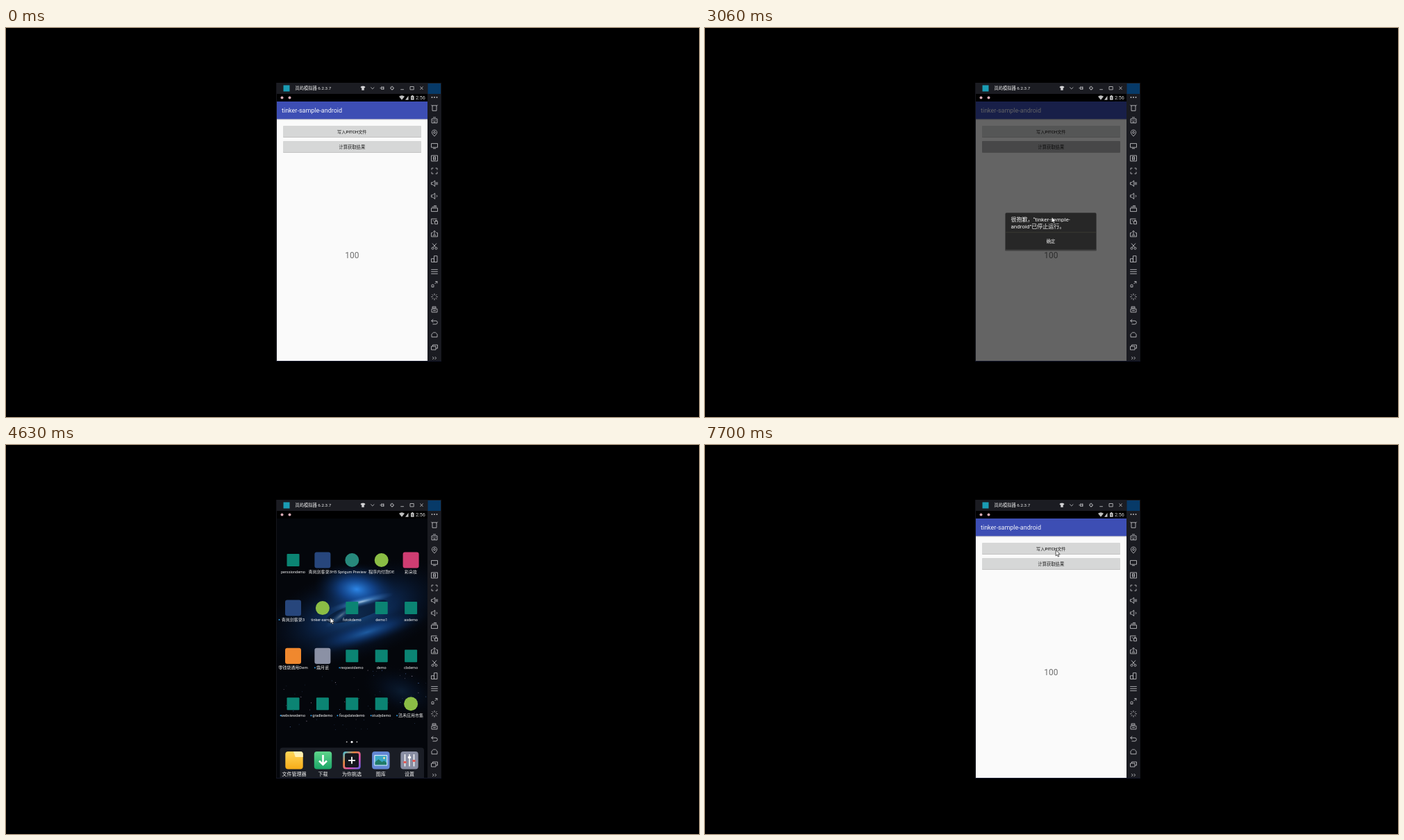
An HTML page for the animation above (8 s loop, 998 by 561 pixels).

```html
<!DOCTYPE html>
<html lang="zh">
<head>
<meta charset="utf-8">
<style>
  html, body { margin: 0; width: 100%; height: 100%; overflow: hidden; background: #000; }
  svg { display: block; width: 100%; height: 100%; }
  text { font-family: Roboto, "Noto Sans CJK SC", "Noto Sans CJK", sans-serif; }
  .mid { text-anchor: middle; }
  .line { fill: none; stroke: #b9b9bd; stroke-width: .9; }
</style>
</head>
<body>
<svg id="stage" viewBox="0 0 998 561">
  <defs>
    <radialGradient id="glow">
      <stop offset="0" stop-color="#2f8cf0"/>
      <stop offset=".4" stop-color="#1550a4" stop-opacity=".75"/>
      <stop offset="1" stop-color="#06142c" stop-opacity="0"/>
    </radialGradient>
    <radialGradient id="core">
      <stop offset="0" stop-color="#d4eeff"/>
      <stop offset=".4" stop-color="#5a9fe0" stop-opacity=".6"/>
      <stop offset="1" stop-color="#2a60b0" stop-opacity="0"/>
    </radialGradient>
    <linearGradient id="rainbow" x2="1" y2="1">
      <stop offset="0" stop-color="#35c3e8"/>
      <stop offset=".35" stop-color="#f0883c"/>
      <stop offset=".65" stop-color="#d94fb0"/>
      <stop offset="1" stop-color="#5a63e8"/>
    </linearGradient>
    <linearGradient id="yellow" x2="0" y2="1">
      <stop offset="0" stop-color="#ffd75a"/><stop offset="1" stop-color="#f7ac18"/>
    </linearGradient>
    <linearGradient id="green" x2="0" y2="1">
      <stop offset="0" stop-color="#5fd58c"/><stop offset="1" stop-color="#1ba668"/>
    </linearGradient>
    <clipPath id="screen"><rect x="390" y="95" width="217" height="385"/></clipPath>
  </defs>
  <rect width="998" height="561"/>
  <rect x="389" y="79" width="238" height="402" fill="#15161c"/>
  <g clip-path="url(#screen)">
    <g id="home"></g>
    <g id="app">
      <rect x="390" y="106" width="217" height="374" fill="#fafafa"/>
      <g id="content">
        <rect x="390" y="131" width="217" height="1" fill="#c9c9cd"/>
        <rect x="390" y="132" width="217" height="1" fill="#e6e6e8"/>
        <rect x="390" y="106" width="217" height="25.3" fill="#3d4eb4"/>
        <text x="397" y="122" font-size="9" fill="#f2f3fa">tinker-sample-android</text>
        <rect x="399" y="141.8" width="199" height="16.2" rx="1" fill="#bcbcbc"/>
        <rect id="write" x="399" y="141" width="199" height="16.2" rx="1"/>
        <text class="mid" x="498.3" y="151.7" font-size="6.2" font-weight="500" fill="#222">写入PITCH文件</text>
        <rect x="399" y="163.8" width="199" height="16.2" rx="1" fill="#bcbcbc"/>
        <rect id="compute" x="399" y="163" width="199" height="16.2" rx="1"/>
        <text class="mid" x="498.3" y="173.5" font-size="6.3" font-weight="500" fill="#222">计算获取结果</text>
        <text class="mid" x="498.3" y="332" font-size="11.9" fill="#6f6f6f">100</text>
      </g>
    </g>
    <rect id="dim" x="390" y="106" width="217" height="374"/>
    <g id="dialog">
      <rect x="432" y="267" width="132" height="54.5" rx="1.5" opacity=".35"/>
      <rect x="433" y="266.5" width="130" height="53" rx="1" fill="#272727"/>
      <path d="M433 294.7h130" stroke="#3d3d35" stroke-width=".8"/>
      <text x="440.5" y="278.8" font-size="8" fill="#f4f4f4">很抱歉，“tinker-sample-</text>
      <text x="440.5" y="288.6" font-size="8" fill="#f4f4f4">android”已停止运行。</text>
      <text id="ok" class="mid" x="498" y="309.6" font-size="6.3" fill="#f4f4f4">确定</text>
    </g>
  </g>
  <g id="chrome"></g>
  <path id="cursor" d="M0 0V8.4L1.9 6.7 3.2 9.6 4.6 9 3.3 6.2H6Z" fill="#fff" stroke="#111" stroke-width=".7"/>
</svg>
<script>
const LOOP = 8000;
const $ = id => document.getElementById(id);
const rect = (x, y, w, h, fill, rx = 0) =>
  `<rect x="${x}" y="${y}" width="${w}" height="${h}" rx="${rx}" fill="${fill}"/>`;
const circle = (x, y, r, fill) => `<circle cx="${x}" cy="${y}" r="${r}" fill="${fill}"/>`;
const label = (x, y, size, fill, text) =>
  `<text class="mid" x="${x}" y="${y}" font-size="${size}" fill="${fill}">${text}</text>`;
const icon = (x, y, d) => `<path class="line" transform="translate(${x} ${y})" d="${d}"/>`;
const ellipse = (x, y, rx, ry, turn, fill, opacity) =>
  `<ellipse rx="${rx}" ry="${ry}" transform="translate(${x} ${y}) rotate(${turn})" fill="${fill}" opacity="${opacity}"/>`;

function random(seed) {
  return () => (seed = (seed * 16807) % 2147483647) / 2147483647;
}

function wallpaper() {
  const rnd = random(71);
  let out = rect(390, 95, 217, 385, '#04060b')
    + ellipse(505, 242, 145, 68, -18, 'url(#glow)', .55)
    + ellipse(505, 208, 62, 38, 8, 'url(#glow)', .95)
    + ellipse(520, 270, 95, 19, -17, 'url(#glow)', .55)
    + ellipse(505, 240, 46, 11, -17, '#07142b', .6)
    + ellipse(512, 226, 48, 7, -14, 'url(#core)', .75)
    + ellipse(482, 246, 28, 6, -38, 'url(#core)', .4)
    + ellipse(570, 355, 60, 34, 20, 'url(#glow)', .16);
  for (let i = 0; i < 75; i++) {
    const x = 400 + rnd() * 205, y = 322 + rnd() * 90;
    out += circle(x, y, .25 + rnd() * .35, i % 3 ? '#46659b' : '#8f8197');
  }
  return out;
}

// [label, colour, shape, has a "new" dot]
const TEAL = '#0b8473', LIME = '#8bbd45', NAVY = '#27467c';
const APPS = [
  ['perssiondemo', TEAL], ['青岚剑客录3H5', NAVY, 'big'], ['Sprigum Preview', '#27897c', 'round'],
  ['程序内付款DE', LIME, 'round'], ['彩朵妆', '#cf3d72', 'big'],
  ['青岚剑客录3', NAVY, 'big', 1], ['tinker-sample', LIME, 'round'], ['fotokdemo', TEAL],
  ['demo1', TEAL], ['asdemo', TEAL],
  ['零钱袋通用Dem', '#f0882e', 'big'], ['霜月谣', '#8b91a5', 'big', 1], ['reqoestdemo', TEAL, '', 1],
  ['demo', TEAL], ['cbdemo', TEAL],
  ['webviewdemo', TEAL, '', 1], ['gradledemo', TEAL, '', 1], ['fixupdatedemo', TEAL, '', 1],
  ['studydemo', TEAL, '', 1], ['迅禾应用市集', LIME, 'round', 1]
];

function appIcon([name, color, shape, fresh], i) {
  const x = 413.5 + (i % 5) * 42.4, y = 166 + Math.floor(i / 5) * 69.1;
  const mark = shape === 'round' ? circle(x, y, 10, color)
    : shape === 'big' ? rect(x - 11.5, y - 11.5, 23, 23, color, 3)
    : rect(x - 9, y - 9, 18, 18, color, 1);
  const cjk = name.charCodeAt(0) > 255;
  const half = name.length * (cjk ? 3 : 1.45) + 2;
  return mark + label(x, y + 19, cjk ? 6 : 5.5, '#f0f0f0', name)
    + (fresh ? circle(x - half, y + 17, 1, '#2f9fe8') : '');
}

function dock() {
  const xs = [415, 456.5, 498, 539.8, 581];
  const tile = (i, fill) => rect(xs[i] - 12.7, 442, 25.4, 25.5, fill, 4);
  const stroke = (color, width, d) => `<path d="${d}" fill="none" stroke="${color}" stroke-width="${width}"/>`;
  return rect(394.5, 436.5, 207.5, 50, '#1a1d25', 4)
    + tile(0, 'url(#yellow)') + `<path d="M414 442h10q3.7 0 3.7 4v4h-11z" fill="#fff0b3"/>`
    + tile(1, 'url(#green)') + stroke('#fff', 2.6, 'M456.5 447v13M451 455.5l5.5 5.5 5.5-5.5')
    + tile(2, 'url(#rainbow)') + rect(488, 444.5, 20, 20.5, '#15171e', 2)
    + stroke('#fff', 1.8, 'M493 454.8h10M498 449.8v10')
    + tile(3, '#6387d2') + rect(530.3, 447, 19, 15.5, '#d5eafa', 1) + rect(531.5, 448.2, 16.6, 13.1, '#3aa7c4')
    + `<path d="M531.5 461.3v-4l5-4 5 4 3-2 3.6 3v3z" fill="#217b67"/>` + circle(544.5, 451.5, 1.4, '#f4e7a0')
    + tile(4, '#888da2') + stroke('#f4f4f6', 1.6, 'M574.5 446v17.5M581 446v17.5M587.5 446v17.5')
    + rect(572.3, 456, 4.4, 3, '#e45b57', 1) + rect(578.8, 449, 4.4, 3, '#fff', 1) + rect(585.3, 454, 4.4, 3, '#e45b57', 1)
    + ['文件管理器', '下载', '为你挑选', '图库', '设置'].map((s, i) => label(xs[i], 476.8, 7, '#f4f4f4', s)).join('');
}

const SPEAKER = 'M-4.5-1.5h2l3.2-2.7v8.4l-3.2-2.7h-2z';
const SIDE = [
  'M-3-3.5h6v7.5h-6zM-4.5-4.5l1.5 2M4.5-4.5l-1.5 2',
  'M-4-2.5h8v6h-8zM-2-4.5h4M-2.5 0h1M-.5 0h1M1.5 0h1M-1.5 2h3',
  'M0 4.5C-6-1-3.5-4.5 0-4.5S6-1 0 4.5zM-1.4-1a1.4 1.4 0 1 0 2.8 0a1.4 1.4 0 1 0-2.8 0',
  'M-4.5-3.2h9v5.6h-9zM-2 4h4',
  'M-4.5-4h9v8h-9zM-1.5-2.2h3v4.4h-3zM-1.5 0h3',
  'M-4-1.5V-4h2.5M1.5-4H4v2.5M4 1.5V4H1.5M-1.5 4H-4V1.5',
  SPEAKER + 'M2.5-2v4M4.3-2v4',
  SPEAKER + 'M3-1.5q2 1.5 0 3',
  'M-4.5-.8h9v4.8h-9zM-3.5-2.6h7M-1-4.2h4',
  'M-4.5 3.5v-7h8M-4.5 3.5h3M.5 0h4v4h-4zM1.5 0v-1.5h2V0M-2.5-1.5l2 1.5',
  'M-2.5-1.5h-2v5.5h9v-5.5h-2M0 1.5v-6M-2-2.5l2-2 2 2M-2.5 2h5',
  'M-3-4.5l5 6M3-4.5l-5 6M-4 2.7a1.5 1.5 0 1 0 3 0a1.5 1.5 0 1 0-3 0M1 2.7a1.5 1.5 0 1 0 3 0a1.5 1.5 0 1 0-3 0',
  'M-4.5-.5h4v4.8h-4zM-.5-4.5h4.5v8.8h-4.5z',
  'M-4.8-3h9.6M-4.8 0h9.6M-4.8 3h9.6',
  'M.5-.5l3.5-3.5M1.2-4H4v2.8M-4 4V1a2.5 2.5 0 0 1 3 0v3z',
  'M0-4.8v2.5M0 2.3v2.5M-4.8 0h2.5M2.3 0h2.5M-3.4-3.4l1.6 1.6M1.8 1.8l1.6 1.6M-3.4 3.4l1.6-1.6M1.8-1.8l1.6-1.6',
  'M-4-.8h8v4.8h-8zM-3-4h5v2h-5zM-2 1.6h4',
  'M-1.7-4l-2.8 2.3 2.8 2.3M-4-1.7h6q2.3 0 2.3 2.4t-2.3 2.4h-4.5',
  'M-4.6 0L-1.5-3h3L4.6 0M-4 0v3.5h8v-3.5',
  'M-4.5-1.3h6.5v5h-6.5zM-2.5-1.3v-2h7v5h-2.5'
];

function chrome() {
  return rect(389, 79, 218, 16, '#1b1c22') + rect(607, 79, 19.5, 402, '#1a1b21')
    + rect(607.5, 80, 18.5, 15, '#073a68') + rect(390, 95, 217, 11, '#000')
    + rect(389, 79, 1, 402, '#15161c') + rect(389, 480, 238, 1, '#12162a')
    + rect(399.5, 82.5, 9, 9, '#1a9cb4')
    + '<text x="416.5" y="89" font-size="6.25" fill="#eee">岚屿模拟器 6.2.3.7</text>'
    + '<path d="M510.5 85l2-1.3h3l2 1.3-1 1.6-.8-.4v3.5h-3.4v-3.5l-.8.4z" fill="#d4d4d6"/>'
    + icon(527.8, 86.7, 'M-2.5-1.2l2.5 2.4 2.5-2.4')
    + icon(541.8, 86.7, 'M-3.3 0h2.3M-1-2.3v4.6M-1-1.4h3v2.8h-3M2-2.3v4.6')
    + icon(556, 86.7, 'M-2 0a2 2 0 1 0 4 0a2 2 0 1 0-4 0M0-3v1M0 2v1M-3 0h1M2 0h1M-2-2l.6.6M1.4 1.4l.6.6')
    + icon(570.6, 86.7, 'M-2.3 2h4.6') + icon(584.6, 86.7, 'M-2.6-2.2h5.2v4.4h-5.2z')
    + icon(598.5, 86.7, 'M-2-2.2l4 4.4M2-2.2l-4 4.4')
    + circle(397.5, 100.5, 2, '#d6a9b4') + circle(408.5, 100.5, 2, '#d6a9b4')
    + '<path d="M566 98.8q4-3.2 8 0l-4 5zM575 103.7h4.5v-6z" fill="#bfbfbf"/>'
    + rect(583, 98, 4.6, 5.8, '#c8c8c8', .5) + rect(584.3, 97, 2, 1, '#c8c8c8')
    + '<path d="M585.6 99l-1.3 2h1.6l-1 1.8" fill="none" stroke="#222" stroke-width=".6"/>'
    + '<text x="590" y="103.2" font-size="7.2" fill="#cfcfcf">2:56</text>'
    + [613.5, 617, 620.5].map(x => circle(x, 100, .9, '#c4c4c8')).join('')
    + SIDE.map((d, i) => icon(617, 115.3 + i * 18.16, d)).join('')
    + icon(617, 476, 'M-2.8-2l2 2-2 2M.6-2l2 2-2 2');
}

$('home').innerHTML = wallpaper() + APPS.map(appIcon).join('')
  + circle(490.7, 428.3, 1, '#aaa') + circle(498, 428.3, 1.5, '#fff') + circle(505.4, 428.3, 1, '#aaa') + dock();
$('chrome').innerHTML = chrome();

// Rows are [time, value, ...], interpolated linearly.
function track(rows, t) {
  let i = 0;
  while (i < rows.length - 1 && rows[i + 1][0] <= t) i++;
  const a = rows[i], b = rows[i + 1];
  if (!b || t <= a[0]) return a.slice(1);
  const p = (t - a[0]) / (b[0] - a[0]);
  return a.slice(1).map((v, k) => v + (b[k + 1] - v) * p);
}

const CURSOR = [
  [280, 575, 465], [600, 545, 300], [1060, 496, 186], [1300, 499, 168.7], [2650, 499, 168.7],
  [2900, 502, 235], [3200, 497, 305], [3380, 496, 307], [3560, 484.3, 322], [4100, 471, 278],
  [4630, 467, 249], [5000, 461, 242.3], [5800, 460.7, 242], [6250, 485, 195], [6600, 501, 174],
  [7160, 505.2, 151.5]
];
const DIM = [[2540, 0], [2780, .6], [3520, .6], [3800, 0]];
const DIALOG = [[2520, 0], [2600, 1], [3530, 1], [3700, 0]];
const OK_TEXT = [[2600, .12], [2800, 1]];
const CLOSING = [[3320, 1, 1], [3560, .687, .07], [3620, .66, 0]];
const LAUNCH = 5190, LAUNCH_MS = 260, READY = 5820;

const scaleAt = (x, y, s) => `translate(${x} ${y}) scale(${s}) translate(${-x} ${-y})`;
const opacity = (id, v) => $(id).setAttribute('opacity', v);

function render(t) {
  const [x, y] = track(CURSOR, t);
  $('cursor').setAttribute('transform', `translate(${x} ${y})`);
  opacity('cursor', t < 280 ? 0 : 1);

  if (t < LAUNCH) {
    const [s, alpha] = track(CLOSING, t);
    $('app').setAttribute('transform', scaleAt(498.5, 287, s));
    opacity('app', alpha);
  } else {
    const left = 1 - Math.min(1, (t - LAUNCH) / LAUNCH_MS);
    $('app').setAttribute('transform', scaleAt(456, 235, 1 - .9 * left * left));
    opacity('app', 1);
  }
  opacity('content', t >= LAUNCH && t < READY ? 0 : 1);
  opacity('dim', track(DIM, t)[0]);
  opacity('dialog', track(DIALOG, t)[0]);
  opacity('ok', track(OK_TEXT, t)[0]);

  const pressed = (from, to) => t >= from && t < to ? '#b2b2b5' : '#d6d7d7';
  $('write').setAttribute('fill', pressed(7330, 7560));
  $('compute').setAttribute('fill', pressed(2460, 3320));
}

const start = performance.now();
function tick() {
  render((performance.now() - start) % LOOP);
  requestAnimationFrame(tick);
}
tick();
</script>
</body>
</html>
```
